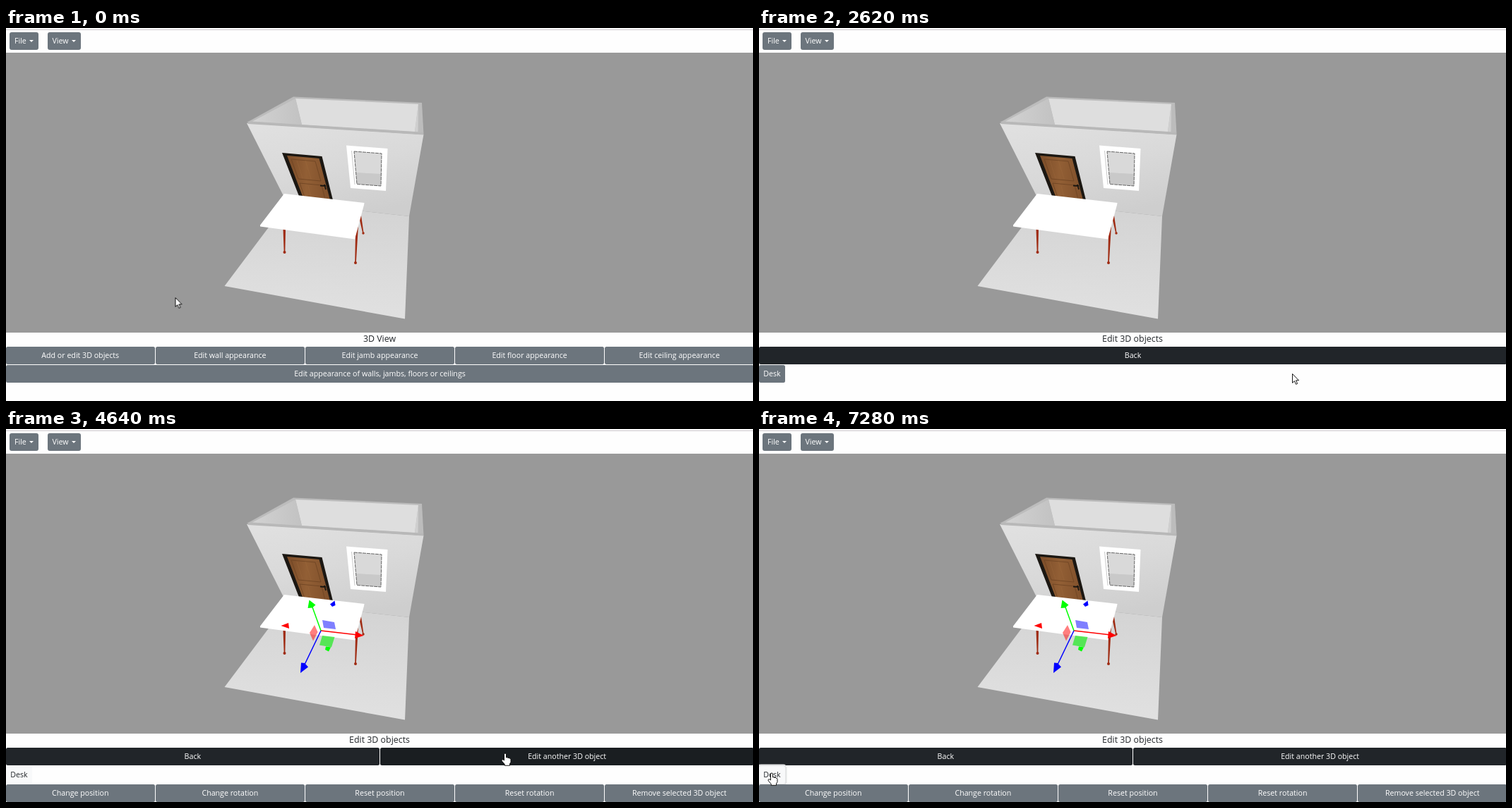
Write an HTML page that moves like this. It is 1058 by 529 pixels and loops after 8 s.

```html
<!DOCTYPE html>
<html lang="en">
<head>
<meta charset="utf-8">
<title>3D room editor</title>
<style>
html, body { margin: 0; width: 100%; height: 100%; overflow: hidden; background: #fff; }
#stage { position: relative; width: 1058px; height: 529px; overflow: hidden; background: #fefefe;
  font: 10.65px/25px "Open Sans", "Noto Sans", sans-serif; color: #fff; }
svg { position: absolute; left: 0; top: 0; overflow: visible; }

/* menu bar */
.line { position: absolute; top: 2px; width: 100%; height: 1px; background: #cdc9cd; }
.menu { position: absolute; top: 6px; height: 25px; box-sizing: border-box; padding-left: 7px;
  border-radius: 3px; background: #6c757d; }
.menu::after { content: ""; position: absolute; right: 7px; top: 10.5px;
  border: 3.2px solid transparent; border-top-color: #fff; border-bottom: 0; }

/* bottom panels */
.panel { position: absolute; left: 0; top: 432px; width: 100%; height: 97px; }
.panel h1 { position: absolute; top: -1px; width: 100%; margin: 0; text-align: center;
  font-size: 12.4px; font-weight: 400; line-height: 20px; color: #212529; }
.row { position: absolute; top: 20px; width: 1059px; height: 25px; display: grid;
  grid-auto-flow: column; grid-auto-columns: 1fr; column-gap: 1.6px; text-align: center; }
.two { top: 46px; }
.three { top: 71.5px; }
.row span, .desk { border-radius: 2.5px; background: #6c757d; }
.row .dark { background: #212529; }
.desk { position: absolute; top: 46px; width: 37px; height: 24.5px; text-align: center; }
.picked { background: #f8f9fa; color: #212529; }

/* timing: every change is a hard step */
.panel, .panel span, .gizmo, #cursor, #cursor * { animation: 8s step-end infinite; }
.panel, .gizmo, .click, .hand { opacity: 0; }
#first { opacity: 1; animation-name: first; }
#add { animation-name: add; }
#choose { animation-name: choose; }
#list { animation-name: list; }
#edit, .gizmo { animation-name: edit; }
#choose .dark { animation-name: choose-back; }
#pick { animation-name: pick; }
#list .dark { animation-name: list-back; }
#list .desk { animation-name: list-desk; }
#edit-back { animation-name: edit-back; }
#another { animation-name: another; }
#edit .desk { animation-name: focus; }
#cursor { transform: translate(239.5px, 382px); animation-name: move; }
#cursor .click { animation-name: click; }
#cursor .hand { animation-name: hand; }
#cursor .arrow { animation-name: arrow; }

@keyframes first { 20.25% { opacity: 0 } 100% { opacity: 0 } }
@keyframes choose { 20.25% { opacity: 1 } 32.75% { opacity: 0 } }
@keyframes list { 32.75% { opacity: 1 } 45.37% { opacity: 0 } 75.25% { opacity: 1 } 90.99% { opacity: 0 } }
@keyframes edit { 45.37% { opacity: 1 } 75.25% { opacity: 0 } 90.99% { opacity: 1 } }
@keyframes add {
  17.12% { background: #5c636a; box-shadow: none }
  18.62%, 100% { background: #565e64; box-shadow: 0 0 0 2.7px #b9bec2 }
}
@keyframes choose-back { 21.75% { background: #1a1e21 } 29.62% { background: #212529 } }
@keyframes pick { 29.62%, 100% { background: #5c636a } }
@keyframes list-back {
  75.25% { background: #1a1e21 } 78.37% { background: #212529 }
  83.12% { background: #1a1e21 } 84.62% { background: #212529 }
}
@keyframes list-desk { 84.62%, 100% { background: #5c636a } }
@keyframes edit-back { 54.87% { background: #1a1e21 } 56.37% { background: #212529 } }
@keyframes another { 56.37% { background: #1a1e21 } 75.25% { background: #212529 } }
@keyframes focus { 90.99%, 100% { box-shadow: 0 0 0 2.5px #e4e5e6 } }
@keyframes click {
  18.62% { opacity: 1 } 20.25% { opacity: 0 } 31.25% { opacity: 1 } 32.75% { opacity: 0 }
  43.99% { opacity: 1 } 45.37% { opacity: 0 } 73.75% { opacity: 1 } 75.25% { opacity: 0 }
  89.37% { opacity: 1 } 90.99% { opacity: 0 }
}
@keyframes hand {
  15.5% { opacity: 1 } 32.75% { opacity: 0 } 54.87% { opacity: 1 }
  78.37% { opacity: 0 } 83.12% { opacity: 1 }
}
@keyframes arrow {
  15.5% { opacity: 0 } 32.75% { opacity: 1 } 54.87% { opacity: 0 }
  78.37% { opacity: 1 } 83.12% { opacity: 0 }
}
@keyframes move {
  12.37% { transform: translate(228px, 394px) }
  14% { transform: translate(200px, 425px) }
  15.5% { transform: translate(166px, 454px) }
  17.12% { transform: translate(153px, 461px) }
  21.75% { transform: translate(160px, 462px) }
  23.37% { transform: translate(215px, 465px) }
  25% { transform: translate(390px, 469px) }
  26.5% { transform: translate(600px, 475px) }
  28.12% { transform: translate(757px, 482px) }
  29.62% { transform: translate(755px, 490px) }
  34.37% { transform: translate(722px, 448px) }
  36% { transform: translate(640px, 395px) }
  37.5% { transform: translate(550px, 335px) }
  39.12% { transform: translate(488px, 297px) }
  40.62% { transform: translate(465px, 285px) }
  51.62% { transform: translate(470px, 315px) }
  53.25% { transform: translate(492px, 390px) }
  54.87% { transform: translate(521px, 457px) }
  56.37% { transform: translate(630px, 461px) }
  57.99% { transform: translate(707px, 460px) }
  78.37% { transform: translate(560px, 430px) }
  80% { transform: translate(210px, 419px) }
  81.49% { transform: translate(35px, 449px) }
  83.12% { transform: translate(23px, 468px) }
  84.62% { transform: translate(19px, 484px) }
  86.25%, 100% { transform: translate(18px, 488px) }
}
</style>
</head>
<body>
<div id="stage">
  <div class="line"></div>
  <div class="menu" style="left:5px;width:41px">File</div>
  <div class="menu" style="left:58.5px;width:47.5px">View</div>

  <svg width="1058" height="529">
    <defs>
      <linearGradient id="wall" x1=".2" y1="0" x2=".6" y2="1">
        <stop offset="0" stop-color="#e0e0e0"/><stop offset=".5" stop-color="#d9d9d9"/><stop offset="1" stop-color="#cecece"/>
      </linearGradient>
      <linearGradient id="floor" x1=".6" y1="0" x2=".5" y2="1">
        <stop offset="0" stop-color="#d3d3d3"/><stop offset="1" stop-color="#e1e1e1"/>
      </linearGradient>
      <linearGradient id="side" x1="0" x2="1">
        <stop offset="0" stop-color="#d2d2d2"/><stop offset="1" stop-color="#c2c2c2"/>
      </linearGradient>
      <linearGradient id="wood" x1="0" x2="1">
        <stop offset="0" stop-color="#7c4d29"/><stop offset=".45" stop-color="#925f35"/><stop offset="1" stop-color="#80502b"/>
      </linearGradient>
    </defs>
    <path fill="#999" d="M0 35H1058V432H0z"/>

    <!-- room -->
    <path fill="url(#floor)" d="M398 248 571 267 565 412.500 309.500 366z"/>
    <path fill="#bcbcbc" d="M341 134 407 97.500 589 106 591.500 150.500z"/>
    <path fill="#dedede" d="M410 100 584 108 579 147 419 137z"/>
    <path fill="url(#side)" d="M349 132.500 410 100 419 137z"/>
    <path fill="#cfcfcf" d="M584 108 579 147 583.500 147.500z"/>
    <path fill="url(#wall)" d="M341 135 591.500 151 571 267 398 248z"/>
    <path fill="none" stroke="#b8b8b8" stroke-width="3.500" d="M343 134.300 591 149.800"/>

    <!-- door -->
    <path fill="#1b1712" d="M391 177 447.500 182 463 244 416 241z"/>
    <path fill="url(#wood)" d="M398 181 443.500 185 459 244 421 241z"/>
    <path fill="none" stroke="#6d4323" stroke-width=".8" d="M404 186 438 189 446 217 414 214zM416 220 447 223 452 243M416 220 423 240"/>
    <path fill="none" stroke="#a06c3f" stroke-width=".6" opacity=".6" d="M412 188 420 213M424 188 432 214M428 224 432 240"/>
    <path fill="none" stroke="#1b1712" stroke-width="1.800" d="M445 223.500 453 224M451 222 453 229"/>

    <!-- window -->
    <path fill="#fff" d="M482 166.500 540.500 171 538 231 488 227z"/>
    <path fill="#d9d9d9" d="M493 175 532 178 531 224 497 221z"/>
    <path fill="#c9c9c9" d="M495.500 205 531.500 207 531 224 497 221z"/>
    <path fill="none" stroke="#555" stroke-width=".9" stroke-dasharray="5 1" d="M493 175 532 178 531 224 497 221.500z"/>
    <path fill="none" stroke="#bbb" stroke-width=".8" d="M489.500 174 494 222"/>

    <!-- desk -->
    <g fill="#9f2b12">
      <path d="M392.500 285H396L395.300 318H393.700zM495 292 499 280 495.800 333H494.200zM500 268 503 266 506.600 291H505.200z"/>
      <circle cx="394.500" cy="318" r="2"/><circle cx="495" cy="333" r="2"/><circle cx="506" cy="291" r="1.700"/>
    </g>
    <path fill="#fff" d="M394 235 507.500 248 507 251 494 299.500 360 281.500 360 279.500z"/>

    <g class="gizmo">
      <g fill="none" stroke-width="1.500">
        <path stroke="#f00" d="M446 286 498 292"/>
        <path stroke="#0f0" d="M446 286 433 250"/>
        <path stroke="#00f" d="M446 286 422 336"/>
      </g>
      <path fill="#f00" d="M495 287 506.500 293 494 297zM389.500 279 400 275 401 283z"/>
      <path fill="#0f0" d="M429.500 242.500 438.500 249.500 434 253.500 427.500 254zM453 308.500 460 309.500 457 315.500 452 313z"/>
      <path fill="#00f" d="M417 346 418 331.500 423 332 428 337.500zM465.500 243.500 466.500 250 462 252 459 248.500z"/>
      <path fill="#00f" opacity=".5" d="M448 271 465 274 467 284 450 282z"/>
      <path fill="#f00" opacity=".5" d="M430 289 437 278 441.500 288 435 300.500z"/>
      <path fill="#0e0" opacity=".6" d="M448 293 465.500 295 461 309.500 444 306.500z"/>
    </g>
  </svg>

  <div class="panel" id="first">
    <h1>3D View</h1>
    <div class="row">
      <span id="add">Add or edit 3D objects</span><span>Edit wall appearance</span><span>Edit jamb appearance</span><span>Edit floor appearance</span><span>Edit ceiling appearance</span>
    </div>
    <div class="row two"><span>Edit appearance of walls, jambs, floors or ceilings</span></div>
  </div>

  <div class="panel" id="choose">
    <h1>Add or edit 3D objects</h1>
    <div class="row"><span class="dark">Back</span></div>
    <div class="row two"><span>Add 3D object</span><span id="pick">Edit 3D object</span></div>
  </div>

  <div class="panel" id="list">
    <h1>Edit 3D objects</h1>
    <div class="row"><span class="dark">Back</span></div>
    <span class="desk">Desk</span>
  </div>

  <div class="panel" id="edit">
    <h1>Edit 3D objects</h1>
    <div class="row"><span class="dark" id="edit-back">Back</span><span class="dark" id="another">Edit another 3D object</span></div>
    <span class="desk picked">Desk</span>
    <div class="row three">
      <span>Change position</span><span>Change rotation</span><span>Reset position</span><span>Reset rotation</span><span>Remove selected 3D object</span>
    </div>
  </div>

  <svg id="cursor" width="1" height="1">
    <circle class="click" r="9.700" fill="#ff0" fill-opacity=".5"/>
    <g fill="#fff" stroke="#000" stroke-width=".9" stroke-linejoin="round">
      <path class="arrow" d="M.5.5V13.300L3.400 10.600 5.500 15.300 7.600 14.400 5.500 9.800H9.500z"/>
      <path class="hand" d="M-1.500 10V1.200Q-1.500 0 0 0T1.500 1.200V6Q3 5 4 6.500 5.500 5.700 6.200 7.200 8 6.700 8 8.700V12.500L6.500 15V17.300H-.8V15.500L-4.800 10.800Q-5.500 9 -4 8.800T-1.500 10z"/>
    </g>
  </svg>
</div>
</body>
</html>
```
